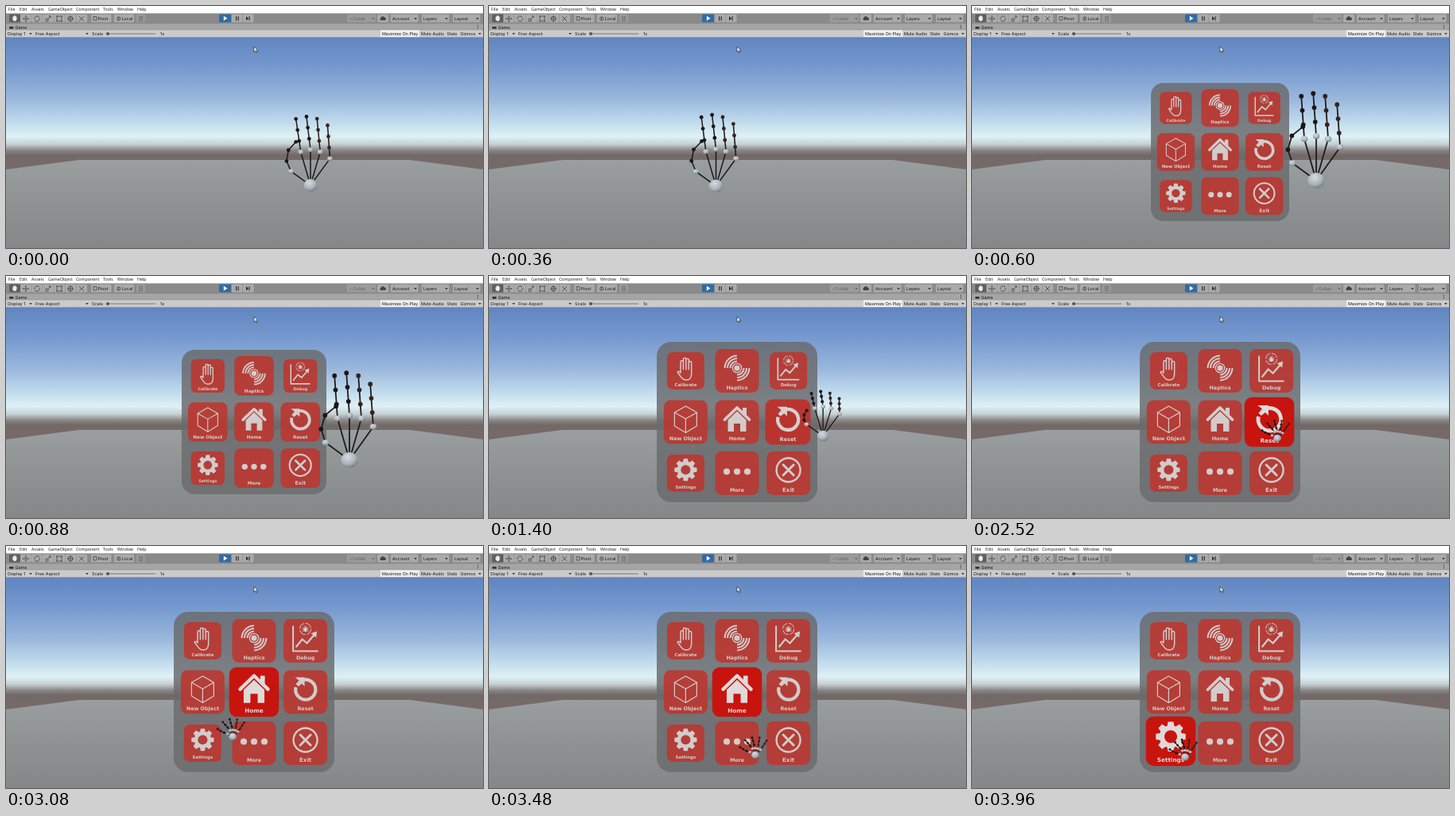
These frames come from a looping animation (600 by 305 pixels, 4000 ms). An HTML page:

```html
<!DOCTYPE html>
<html lang="en">
<head>
<meta charset="utf-8">
<title>Hand menu</title>
<style>
  html, body { margin: 0; width: 100%; height: 100%; overflow: hidden; background: #8e9192; }
  svg { display: block; width: 100vw; height: 100vh; }
  .menu { font: 5.3px "Open Sans", sans-serif; fill: #111; }
  .ui { font: 5.4px Inter, sans-serif; fill: #151515; }
  .off { fill: #626262; }
  .label { font: bold 6.4px "DejaVu Sans", sans-serif; text-anchor: middle; fill: #e0d9d8; }
  .line { fill: none; stroke: #e0d9d8; }
  .solid { fill: #e0d9d8; }
  .tool { fill: none; stroke: #444; stroke-width: .8; }
</style>
</head>
<body>
<svg id="stage" viewBox="0 0 600 305" preserveAspectRatio="none">
  <defs>
    <linearGradient id="sky" gradientUnits="userSpaceOnUse" x1="0" y1="39" x2="0" y2="196">
      <stop offset="0" stop-color="#6085bf"/>
      <stop offset=".25" stop-color="#7699cf"/>
      <stop offset=".5" stop-color="#9ab8dd"/>
      <stop offset=".68" stop-color="#c0daec"/>
      <stop offset=".8" stop-color="#def1f5"/>
      <stop offset=".86" stop-color="#c6d1d4"/>
      <stop offset=".91" stop-color="#8a8686"/>
      <stop offset=".95" stop-color="#716866"/>
      <stop offset="1" stop-color="#766a68"/>
    </linearGradient>
    <linearGradient id="floor" x1="0" y1="0" x2="0" y2="1">
      <stop offset="0" stop-color="#999e9f"/>
      <stop offset=".4" stop-color="#909495"/>
      <stop offset="1" stop-color="#858788"/>
    </linearGradient>
    <radialGradient id="ball" cx=".4" cy=".3" r=".75">
      <stop offset="0" stop-color="#d3dce1"/>
      <stop offset=".6" stop-color="#a9b3b9"/>
      <stop offset="1" stop-color="#6b747a"/>
    </radialGradient>
  </defs>

  <rect y="39" width="600" height="266" fill="url(#sky)"/>
  <rect y="195" width="600" height="20" fill="#766a68"/>
  <path d="M0 206 92 194H508L600 206V305H0Z" fill="url(#floor)"/>

  <g id="panel">
    <rect x="-101" y="-101" width="202" height="202" rx="18" fill="#6b6c6e" opacity=".84"/>
  </g>
  <g id="hand"></g>

  <g id="chrome">
    <rect width="600" height="9.5" fill="#fff"/>
    <rect y="9.5" width="600" height="13" fill="#8a8a8a"/>
    <rect y="22" width="600" height="8" fill="#a5a5a5"/>
    <rect y="30" width="600" height="9.5" fill="#cbcbcb"/>
    <path d="M0 22.2H600M0 30H600M0 39.4H600" stroke="#878787" stroke-width=".5"/>
    <rect x="471" y="30.4" width="49" height="8.6" fill="#efefef"/>
    <path d="M127 35H188" stroke="#777"/>
    <circle cx="128" cy="35" r="2.1" fill="#555"/>
    <rect x="4" y="26" width="5.5" height="2.8" rx="1.2" fill="#333"/>
    <path d="M593.5 24V28.5" stroke="#333" stroke-dasharray="1 .8"/>
  </g>
  <path d="M312 51V58L313.6 56.6 314.7 59 315.8 58.5 314.7 56.2H316.8Z" fill="#fff" stroke="#111" stroke-width=".6"/>
</svg>

<script>
const LOOP = 4000, STEP = 40;
const $ = id => document.getElementById(id);
const mix = (a, b, k) => a + (b - a) * k;
const clamp = v => Math.max(0, Math.min(1, v));

function set(node, attrs) {
  for (const key in attrs) node.setAttribute(key, attrs[key]);
  return node;
}

function add(parent, tag, attrs, text) {
  const node = set(document.createElementNS(parent.namespaceURI, tag), attrs);
  if (text) node.textContent = text;
  return parent.appendChild(node);
}

// Editor bars
const chrome = $("chrome");
const write = (cls, y, items) => {
  for (const [x, text] of items) add(chrome, "text", { class: cls, x, y }, text);
};
const button = (x, w, fill = "#aaa") =>
  add(chrome, "rect", { x, y: 10.6, width: w, height: 10, rx: 1, fill });
const caret = (x, y, fill = "#333") =>
  add(chrome, "path", { d: `M${x - 1.8} ${y - 1}h3.6l-1.8 2.2z`, fill });
const tool = d => add(chrome, "path", { class: "tool", d });

button(4, 14, "#5f5f5f");
for (let i = 1; i < 7; i++) button(4 + 14.1 * i, 13.6);
button(107, 25.5);
button(136, 25);
button(164, 11, "#999");
button(268, 15, "#2f6ca5");
button(284, 13.5);
button(298, 13.5);
button(429, 36, "#9b9b9b");
button(467, 14);
for (const x of [484, 523, 562]) {
  button(x, 34.5);
  caret(x + 31, 16);
}
caret(462, 16, "#666");
for (const x of [31, 102, 596]) caret(x, 35);

add(chrome, "path", { d: "M8.5 15v-1.5h1v-1h1v-.4h1v.5h1v1h1v3.5l-1.3 2H10l-2-2.6z", fill: "#eee" });
tool("M25 12.5v7M21.5 16h7M24 13.4l1-1 1 1M24 18.6l1 1 1-1M22.4 15l-1 1 1 1M27.6 15l1 1-1 1");
tool("M36 17a3 3 0 0 1 5-3.2v-1.5M42 15a3 3 0 0 1-5 3.2v1.5");
tool("M50 19.2v-3h3v3zM53 16l3-3.2M53.8 12.7H56V15");
tool("M64 13h6v6h-6zM63 13h1v-1M70 12v1h1M63 19h1v1M70 20v-1h1");
tool("M78 16a3 3 0 1 1 6 0a3 3 0 1 1-6 0M81 12v8M77 16h8");
tool("M92 13l6 6M98 13l-6 6");
tool("M110 13.5h4v4.5h-4zM139.5 16a2.2 2.2 0 1 0 4.4 0a2.2 2.2 0 1 0-4.4 0M141.7 13.8v4.4");
set(tool("M167 13.5h5M167 16h5M167 18.5h5M168 12.5v7M171 12.5v7"), { opacity: .45 });
add(chrome, "path", { d: "M273.8 12.6v6l4.6-3z", fill: "#fff" });
add(chrome, "path", { d: "M289 13h1.2v5.4H289zM291.6 13h1.2v5.4h-1.2zM302 13v5.4l3.4-2.7zM305.6 13h1.1v5.4h-1.1z", fill: "#333" });
add(chrome, "path", { d: "M471.6 18a1.7 1.7 0 0 1 0-3.2a2.3 2.3 0 0 1 4.3-.4a1.8 1.8 0 0 1 .5 3.6z", fill: "#444" });
set(tool("M432 16l1.2 1.2 2-2.6"), { opacity: .5 });

write("menu", 6.4, [[3, "File"], [17, "Edit"], [32, "Assets"], [53, "GameObject"], [88, "Component"],
  [122, "Tools"], [140, "Window"], [165, "Help"]]);
write("ui", 17.6, [[115.5, "Pivot"], [145.5, "Local"], [486, "Account"], [525, "Layers"], [564, "Layout"]]);
write("ui off", 17.6, [[436, "Collab"]]);
write("ui", 28.6, [[11.5, "Game"]]);
write("ui", 37, [[2, "Display 1"], [37, "Free Aspect"], [108, "Scale"], [194, "1x"],
  [473, "Maximize On Play"], [522, "Mute Audio"], [554.5, "Stats"], [571.5, "Gizmos"]]);

// Menu icons, drawn for a 55px tile centred on 0,0
const line = (g, d, width, extra) => add(g, "path", { class: "line", d, "stroke-width": width, ...extra });
const solid = (g, d, extra) => add(g, "path", { class: "solid", d, ...extra });
const dot = (g, cx, cy, r) => add(g, "circle", { class: "solid", cx, cy, r });
const ring = (g, cx, cy, r, width) => add(g, "circle", { class: "line", cx, cy, r, "stroke-width": width });
const round = { "stroke-linecap": "round", "stroke-linejoin": "round" };

const icons = {
  Calibrate(g) {
    const finger = tip => `V${tip}a2 2 0 0 1 4 0V-2`;
    line(g, `M-7.5 3${[-13, -17, -16, -12].map(finger).join("")}V5Q8 13.5 1 13.5Q-4 13.5-7 9L-12 2Q-11-1-7.5 3Z`, 1.7, round);
  },
  Haptics(g) {
    dot(g, 0, -3.5, 3.6);
    ring(g, 0, -3.5, 5.7, 1.3);
    for (const side of [0, 180])
      for (const r of [8.6, 12, 15.4]) {
        const x = r * Math.cos(.78), y = r * Math.sin(.78);
        line(g, `M${x} ${-y}A${r} ${r} 0 0 1 ${x} ${y}`, 2, { transform: `translate(0 -3.5) rotate(${side + 45})` });
      }
  },
  Debug(g) {
    line(g, "M-15.5-19V13H16", 2);
    line(g, "M-12 8-4-2 2 3 11.5-8", 2.2);
    solid(g, "M7-9.5 14.5-12 13.5-4Z");
    set(ring(g, 0, -15, 7, 1), { "stroke-dasharray": "9 2" });
    add(g, "ellipse", { class: "solid", cx: 0, cy: -14.3, rx: 2, ry: 3 });
    line(g, "M-4-17 4-11.5M4-17-4-11.5M-4-14.3H4M-1.5-19 0-17 1.5-19", .8);
  },
  "New Object"(g) {
    line(g, "M0-20 14-12V5L0 13.5-14 5V-12ZM-14-12 0-4 14-12M0-4V13.5", 1.2, round);
  },
  Home(g) {
    solid(g, "M7-18h5v10L7-13Z");
    line(g, "M-15.5-3 0-18 15.5-3", 3.8, round);
    solid(g, "M0-13.5 11.5-2.5V12H4V2H-4V12H-11.5V-2.5Z");
  },
  Reset(g) {
    line(g, "M-4-14.8A12.6 12.6 0 1 1-12-6", 4.2);
    solid(g, "M-13-18.5H-1V-7L-4.5-10.5-9-7-12-10-8-14.5Z");
  },
  Settings(g) {
    for (let a = 0; a < 360; a += 45)
      solid(g, "M-4.2-10 -3-16.5H3L4.2-10Z", { transform: `translate(0 -5) rotate(${a})` });
    ring(g, 0, -5, 9.8, 5.4);
  },
  More(g) {
    for (const x of [-13, 0, 13]) dot(g, x, -2, 4.1);
  },
  Exit(g) {
    ring(g, 0, -4, 15, 2.4);
    line(g, "M-6.5-10.5 6.5 2.5M6.5-10.5-6.5 2.5", 3, round);
  }
};

// Each hover lasts until the next entry; a small tile stays full-size after its first one
const RAMP = 120, PANEL_IN = 600;
const visits = [
  ["Exit", 1160], ["", 1250], ["Reset", 1370], ["Debug", 1540], ["Haptics", 1780], ["Home", 2220],
  ["Reset", 2400], ["Home", 2660], ["Exit", 3480], ["More", 3640], ["Settings", 3780], ["", LOOP]
];
const small = ["Calibrate", "Debug", "Settings"];

function hover(name, t) {
  return visits.reduce((level, [visited, from], i) => visited === name
    ? Math.max(level, clamp((t - from) / RAMP) * clamp(1 - (t - visits[i + 1][1]) / RAMP))
    : level, 0);
}

const tiles = Object.keys(icons).map((name, i) => {
  const g = add($("panel"), "g", {});
  const face = add(g, "rect", { x: -27.5, y: -27.5, width: 55, height: 55, rx: 8.5 });
  icons[name](g);
  const label = add(g, "text", { class: "label", y: 23.2 }, name);
  if (name === "Exit") label.style.fontSize = "7px";
  const first = visits.find(([visited]) => visited === name);
  return {
    name, g, face,
    x: (i % 3 - 1) * 64.6,
    y: (Math.floor(i / 3) - 1) * 64.5,
    fullFrom: !small.includes(name) ? 0 : first ? first[1] + RAMP : LOOP
  };
});

function drawPanel(t) {
  const grown = clamp((t - PANEL_IN) / 520) ** 2;
  set($("panel"), {
    transform: `translate(312 184) scale(${mix(.861, 1, grown)})`,
    visibility: t < PANEL_IN ? "hidden" : "visible"
  });
  for (const { name, g, face, x, y, fullFrom } of tiles) {
    const level = hover(name, t), pull = 1 - .04 * level;
    const size = mix(t < fullFrom ? 47 : 55, 62.5, level);
    set(g, {
      transform: `translate(${x * pull} ${y * pull}) scale(${size / 55})`,
      opacity: mix(.88, 1, level)
    });
    set(face, { fill: `rgb(${mix(190, 200, level)},${mix(54, 20, level)},${mix(47, 14, level)})` });
  }
}

// Hand: a pose is [palm size, finger length]; the wrist passes one point per beat
const BEAT = 280;
const rest = [.8, .78], open = [1, 1], near = [.65, .32], far = [.15, .26];
const path = [
  [383, 226, ...rest], [268, 228, ...rest], [433, 220, ...open], [432, 232, ...open],
  [441, 243, ...rest], [418, 196, ...near], [411, 143, ...near], [357, 99, ...far],
  [297, 200, ...far], [390, 205, ...far], [325, 228, ...far], [283, 242, ...far],
  [310, 262, ...far], [405, 264, ...far], [268, 266, ...far]
];

// Smooth curve through the points
function along(t) {
  const at = t < 600 ? t / 300 : 2 + (t - 600) / BEAT;
  const i = Math.floor(at), k = at - i;
  const point = n => path[Math.max(0, Math.min(path.length - 1, n))];
  return path[0].map((_, c) => {
    const [p, a, b, q] = [-1, 0, 1, 2].map(n => point(i + n)[c]);
    const bend = .3 * k * (1 - k) * ((1 - k) * (b - p) - k * (q - a));
    return mix(a, b, k * k * (3 - 2 * k)) + bend;
  });
}

const hand = $("hand");
const bones = add(hand, "path", { fill: "none", stroke: "#1d1c1d" });
const joints = Array.from({ length: 20 }, (_, i) =>
  add(hand, "ellipse", { fill: i % 4 ? (i > 11 ? "#38231b" : "#1d1518") : "url(#ball)" }));
const wrist = add(hand, "ellipse", { fill: "url(#ball)" });

function drawHand(t) {
  const [x, y, palm, length] = along(t);
  const r = 4.7 + 6 * palm * palm;
  const lean = -.07 - .25 * (1 - palm);
  const spread = .6 * (1 - palm) ** 2;
  let d = "";
  for (let finger = 0; finger < 5; finger++) {
    const side = finger - 2, thumb = finger === 0;
    const fan = .9 * (1 - palm) * side * 4;
    let jx = x + 15 * side * palm + fan * .35;
    let jy = y - (56 - 3.5 * side * side - (thumb ? 20 : 0)) * palm;
    d += `M${x} ${y}`;
    for (let j = 0; j < 4; j++) {
      if (j) {
        const curl = thumb ? (.6 * j - .85) * (1 - 2 * spread) : 0;
        const angle = lean + spread * side + curl;
        jx += 18 * length * Math.sin(angle);
        jy -= 18 * length * Math.cos(angle);
      }
      d += `L${jx} ${jy}`;
      const rx = j ? r * .25 + .2 : r * .4;
      set(joints[finger * 4 + j], { cx: jx, cy: jy, rx, ry: j ? rx : rx * .85 });
    }
  }
  set(bones, { d, "stroke-width": .5 + r * .12 });
  set(wrist, { cx: x, cy: y, rx: r, ry: r * .93 });
}

const start = performance.now();
function frame() {
  const t = Math.floor((performance.now() - start) % LOOP / STEP) * STEP;
  drawPanel(t);
  drawHand(t);
  requestAnimationFrame(frame);
}
frame();
</script>
</body>
</html>
```
